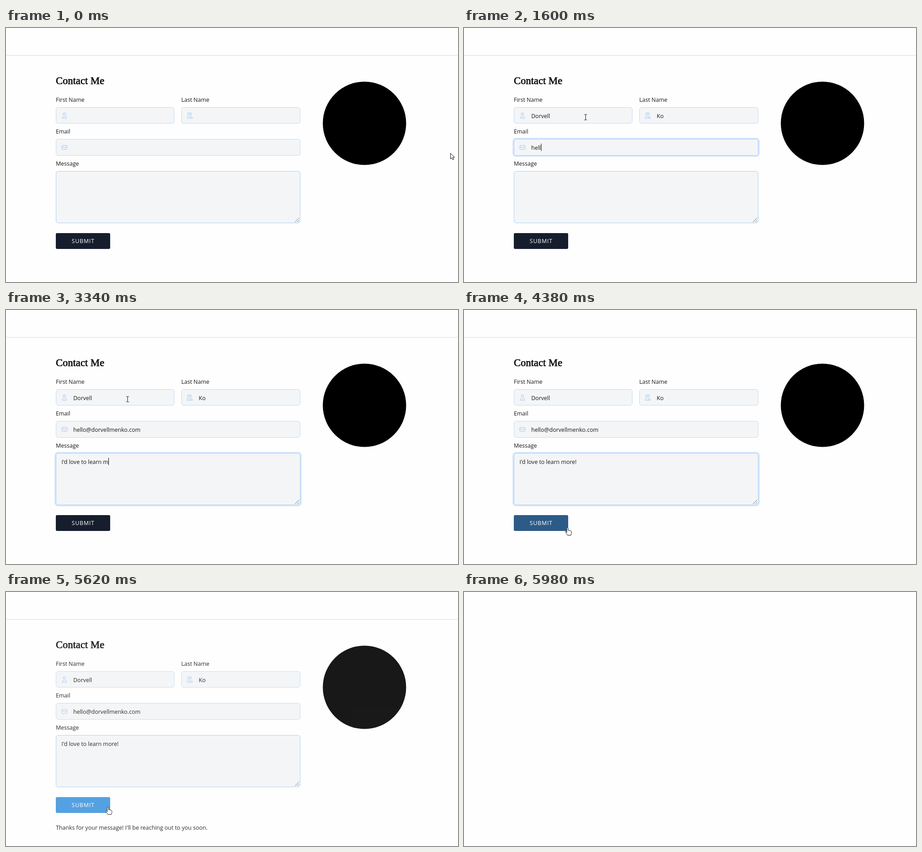
Recreate the animation shown at these times as an HTML page. Size 998 by 561 pixels, loop 6580 ms.

```html
<!DOCTYPE html>
<html lang="en">
<head>
<meta charset="utf-8">
<title>Contact form</title>
<style>
  html, body { margin: 0; width: 100%; height: 100%; overflow: hidden; background: #fefefe; }
  svg { display: block; width: 998px; height: 561px; }
  text { font: 12.5px "Open Sans", sans-serif; fill: #171717; white-space: pre; }
  .title { font: 22.8px "Liberation Serif", serif; fill: #000; stroke: #000; stroke-width: .6; }
  .submit { fill: #fff; letter-spacing: .8px; }
  .box { fill: #f4f5f7; stroke: #bfdcf4; }
  .ring { fill: none; stroke: #a4cafe; stroke-opacity: .45; stroke-width: 3; }
  .focus .box { stroke: #a4cafe; }
  .field:not(.focus) .ring, .field:not(.focus) .caret { display: none; }
  .caret { stroke: #000; }
  .icon { fill: none; stroke: #b0d2f1; stroke-width: 1.2; stroke-linejoin: round; }
  .pointer path { fill: #fff; stroke: #111; stroke-linejoin: round; }
</style>
</head>
<body>
<svg viewBox="0 0 998 561">
  <g id="page">
    <path d="M0 60.5H998" stroke="#dadada"/>
    <text class="title" x="110" y="124">Contact Me</text>
    <circle cx="791.5" cy="210.5" r="92"/>
    <g id="fields"></g>
    <g class="icon">
      <circle cx="129" cy="190" r="2.6"/>
      <path d="M124.3 199.4v-1.2q.5-2.7 3.2-2.7h3q2.7 0 3.2 2.7v1.2z"/>
      <circle cx="403.6" cy="190" r="2.7"/>
      <path d="M399.9 199.4v-1.2q.4-2.7 2.6-2.7h2.4q2.4 0 2.8 2.7v1.2zM406 187.3a2.7 2.7 0 1 1 1 5.2M407.6 195.5h1q2.4 0 2.8 2.7v1.2h-3.6"/>
      <rect x="123.2" y="259.4" width="11.6" height="9" rx="1.8"/>
      <path d="M123.5 261.5l5.5 3.4 5.5-3.4"/>
    </g>
    <path d="M638 428.5l9-9M643.5 428.5l3.5-3.5" stroke="#666"/>
    <rect id="button" x="110" y="453" width="120" height="35" rx="3"/>
    <text class="submit" x="145" y="475">SUBMIT</text>
    <text id="thanks" x="110" y="524.5">Thanks for your message! I'll be reaching out to you soon.</text>
    <g id="pointer" class="pointer">
      <path data-kind="arrow" d="M0 0V12.7L2.9 10 5 14.7 7.1 13.8 5 9.2H8.8Z"/>
      <path data-kind="beam" style="fill:none" d="M-3-6h2q1 0 1 1 0-1 1-1h2M0-5V5M-3 6h2q1 0 1-1 0 1 1 1h2"/>
      <path data-kind="hand" d="M-1.5 11V1.5a1.5 1.5 0 0 1 3 0V6.5c.8-1 2.8-.7 2.8.6.8-.9 2.5-.5 2.5.7.9-.7 2 0 2 1.2V12c0 2-1 2.5-1.2 5H0C-1 14-3.5 12-4.5 10c-.8-1.5 1-2.4 2-1.2z"/>
    </g>
  </g>
</svg>
<script>
const LOOP = 6580, KEY_MS = 41;
const $ = id => document.getElementById(id);
const clamp = v => Math.min(1, Math.max(0, v));
const progress = (t, from, to) => clamp((t - from) / (to - from));
const smooth = u => u * u * (3 - 2 * u);

// focus and blur bound the focus ring; typing starts at "type"
const fields = [
  { label: 'First Name', value: 'Dorvell', x: 110.5, y: 176, w: 261, h: 35, inset: 38, focus: 720, type: 820, blur: 1190 },
  { label: 'Last Name', value: 'Ko', x: 387.5, y: 176, w: 262, h: 35, inset: 38, focus: 1190, type: 1250, blur: 1395 },
  { label: 'Email', value: 'hello@dorvellmenko.com', x: 110.5, y: 246, w: 539, h: 36, inset: 38, focus: 1395, type: 1430, blur: 2420 },
  { label: 'Message', value: "I'd love to learn more!", x: 110.5, y: 317, w: 539, h: 114, inset: 12, focus: 2420, type: 2555, blur: 4560 }
];

for (const f of fields) {
  const { x, y, w, h } = f, base = y + 22.5;
  const g = document.createElementNS('http://www.w3.org/2000/svg', 'g');
  g.innerHTML = `
    <text x="${x - .5}" y="${y - 13}">${f.label}</text>
    <rect class="ring" x="${x - 2}" y="${y - 2}" width="${w + 4}" height="${h + 3}" rx="6.5"/>
    <rect class="box" x="${x}" y="${y - .5}" width="${w}" height="${h}" rx="4.5"/>
    <text class="value" x="${x + f.inset}" y="${base}"></text>
    <path class="caret" d="M.5 ${base - 13}v16"/>`;
  $('fields').append(g);
  f.group = g;
  f.text = g.querySelector('.value');
  f.caret = g.querySelector('.caret');
}
fields[3].group.querySelector('.box').style.stroke = '#a9cff0';

function drawField(f, t) {
  const count = Math.min(f.value.length, Math.max(0, Math.floor((t - f.type) / KEY_MS)));
  const lastKey = count ? f.type + count * KEY_MS : f.focus;
  f.text.textContent = f.value.slice(0, count);
  f.group.setAttribute('class', t >= f.focus && t < f.blur ? 'field focus' : 'field');
  const caretX = Math.round(f.x + f.inset + (count ? f.text.getComputedTextLength() : 0));
  f.caret.setAttribute('transform', `translate(${caretX})`);
  f.caret.style.opacity = (t - lastKey) % 1000 < 500 ? 1 : 0;
}

function pointerAt(t) {
  const arrive = smooth(progress(t, 50, 640));
  const descend = smooth(progress(t, 3480, 4360));
  const settle = smooth(progress(t, 4400, 4600));
  return [
    981.5 - 713 * arrive - 40 * descend ** 3 - 3.5 * settle,
    276.5 - 79.5 * arrive + 283.5 * descend - 6 * settle
  ];
}

function pointerKind(x, y) {
  const inside = r => x >= r.x && x <= r.x + r.w && y >= r.y && y <= r.y + r.h;
  if (inside({ x: 110, y: 453, w: 120, h: 35 })) return 'hand';
  return fields.some(inside) ? 'beam' : 'arrow';
}

function draw(t) {
  fields.forEach(f => drawField(f, t));

  const [x, y] = pointerAt(t), kind = pointerKind(x, y);
  $('pointer').setAttribute('transform', `translate(${x} ${y})`);
  for (const shape of $('pointer').children)
    shape.style.display = shape.dataset.kind === kind ? '' : 'none';

  const hover = progress(t, 4290, 4470), end = [66, 152, 223];
  const color = [22, 29, 45].map((c, i) => c + (end[i] - c) * hover);
  $('button').style.fill = `rgb(${color.map(Math.round)})`;
  $('thanks').style.display = t >= 4760 ? '' : 'none';

  // the closing fade goes in steps of a tenth
  $('page').style.opacity = t < 5620 ? 1 : Math.max(0, 9 - Math.floor((t - 5620) / 40)) / 10;
}

const start = performance.now();
function tick() {
  draw((performance.now() - start) % LOOP);
  requestAnimationFrame(tick);
}
tick();
</script>
</body>
</html>
```
